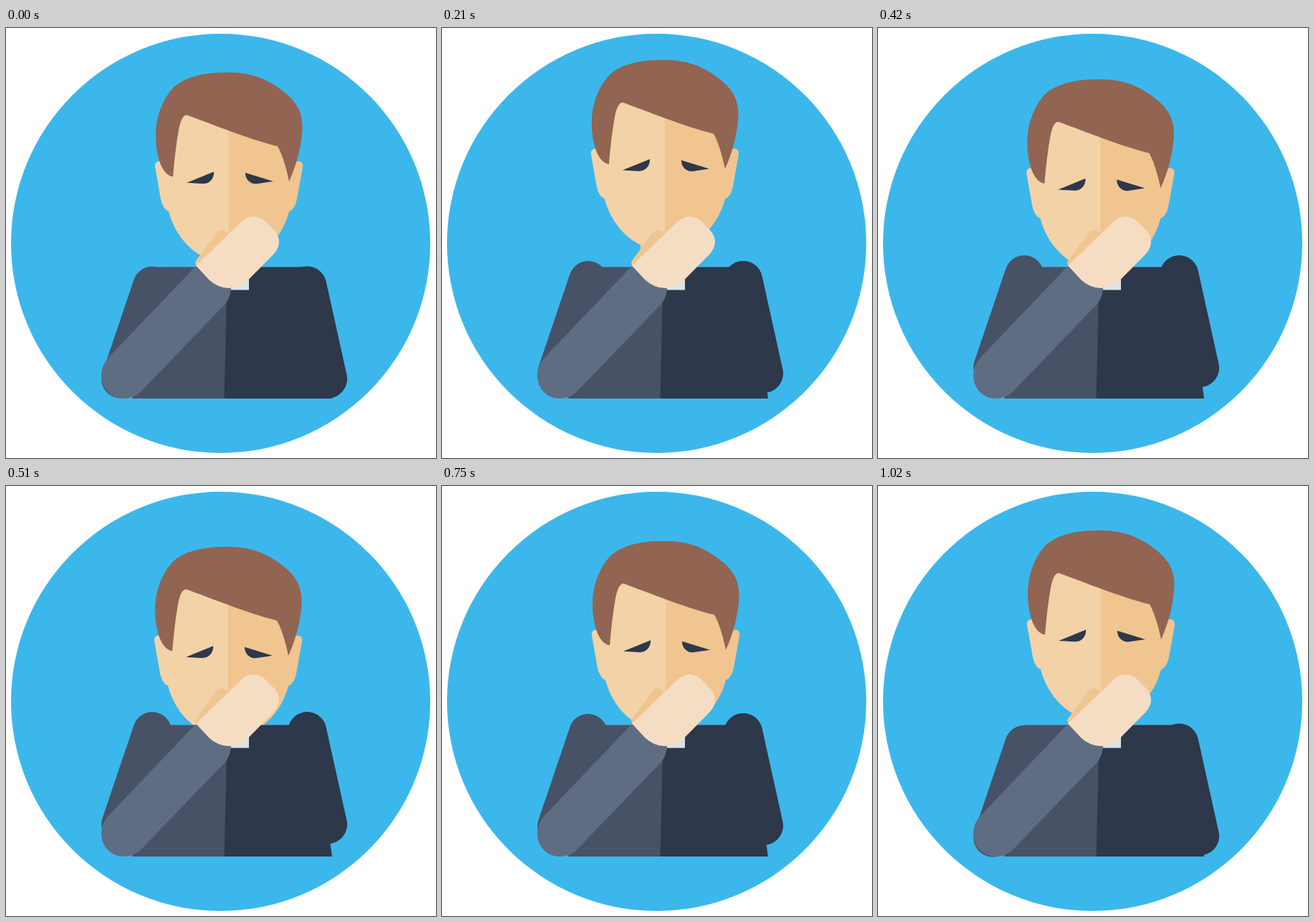
An HTML page for the animation above (2050 ms loop, 600 by 600 pixels).

```html
<!DOCTYPE html>
<html lang="en">
<head>
<meta charset="utf-8">
<title>Coughing man</title>
<style>
html, body { margin: 0; width: 100%; height: 100%; overflow: hidden; background: #fff; }
svg { display: block; width: 100%; height: 100%; }
</style>
</head>
<body>
<svg viewBox="0 0 600 600">
  <circle cx="299.5" cy="300.5" r="292.5" fill="#3cb7eb"/>
  <path d="M277 300H340V345H277Z" fill="#f0c590"/>
  <g id="head">
    <path d="M312 110H225V186H213Q207 187 208 194L216 239Q219 253 227 256C237 294 267 327 312 329Z" fill="#f3d2a7"/>
    <path d="M311 110H392L397 186H409Q415 187 414 194L406 239Q403 253 395 256C385 294 355 327 311 329Z" fill="#f0c590"/>
    <path d="M233 207.500C216 205 209 175 209 150C209 121 221 94 237 80Q260 62 308 62C346 61.500 369 74 389 90C409 106 414 122 413.500 141C412 165 406 190 395 214Q388 181 379 165C345 157 300 139 254 122C247 119 243.500 130 241 142Q236 170 233 207.500Z" fill="#926452"/>
    <path d="M252 216L290 200.500C291 209 284 218 274 217.300ZM373 214L334 202C333.500 210 340 218 349 217.600Z" fill="#2d384b"/>
  </g>
  <path d="M204 333.500H310L305 517H176Z" fill="#485266"/>
  <path d="M309 333.500H414L436 380L455 517H304.500L308 370Z" fill="#2d384b"/>
  <path id="left" d="M178.500 351A27 27 0 0 1 231 360L186 498A27 27 0 0 1 134.500 481Z" fill="#485266"/>
  <path id="right" d="M446.500 353A27 27 0 1 0 394 366L422.500 495A27 27 0 1 0 475.500 484Z" fill="#2d384b"/>
  <path d="M312 340H339V365.500H312Z" fill="#dbe4e7"/>
  <path d="M264 333L143 460Q133 470 133 486A31 31 0 0 0 164 517Q178 517 187.500 508L306 385Q314 376 314.500 358L290 330Z" fill="#5f6d82"/>
  <path d="M268 333Q262 330 265.500 324L293 287Q300 278 309 286L315 295Z" fill="#f0c590"/>
  <path d="M265 331.500L330 269Q345.500 257 361 269L374 282Q388 298 374 315L339 350.500Q329 362 311 363Q296 363 283 351Z" fill="#f5ddc4"/>
</svg>
<script>
const LOOP = 2050, STEP = 30, END = 1020;

// Two coughs: turning points of the head as [time, x, y].
const turns = [[0, 0, 0], [180, 0, -21], [525, -1, 25], [645, 0, -6], [780, 1.4, 21.5], [END, 0, 0]];

const ease = p => p * (0.85 + 0.15 * p);

function headAt(t) {
  const i = Math.max(1, turns.findIndex(k => k[0] >= t));
  const [t0, x0, y0] = turns[i - 1], [t1, x1, y1] = turns[i];
  const e = ease((t - t0) / (t1 - t0));
  return [x0 + (x1 - x0) * e, y0 + (y1 - y0) * e];
}

// A shoulder rises slowly and drops a little faster.
const shrug = (t, span) => -18 * Math.sin(Math.PI * (t / span) ** 1.25);

function move(id, x, y) {
  document.getElementById(id).setAttribute("transform", `translate(${x} ${y})`);
}

function draw(ms) {
  const t = Math.min(END, Math.floor(ms % LOOP / STEP) * STEP);
  move("head", ...headAt(t));
  move("left", 0, shrug(t, 1005));
  move("right", 0, shrug(t, 1035));
}

let start;
function tick(now) {
  start ??= now;
  draw(now - start);
  requestAnimationFrame(tick);
}
draw(0);
requestAnimationFrame(tick);
</script>
</body>
</html>
```
